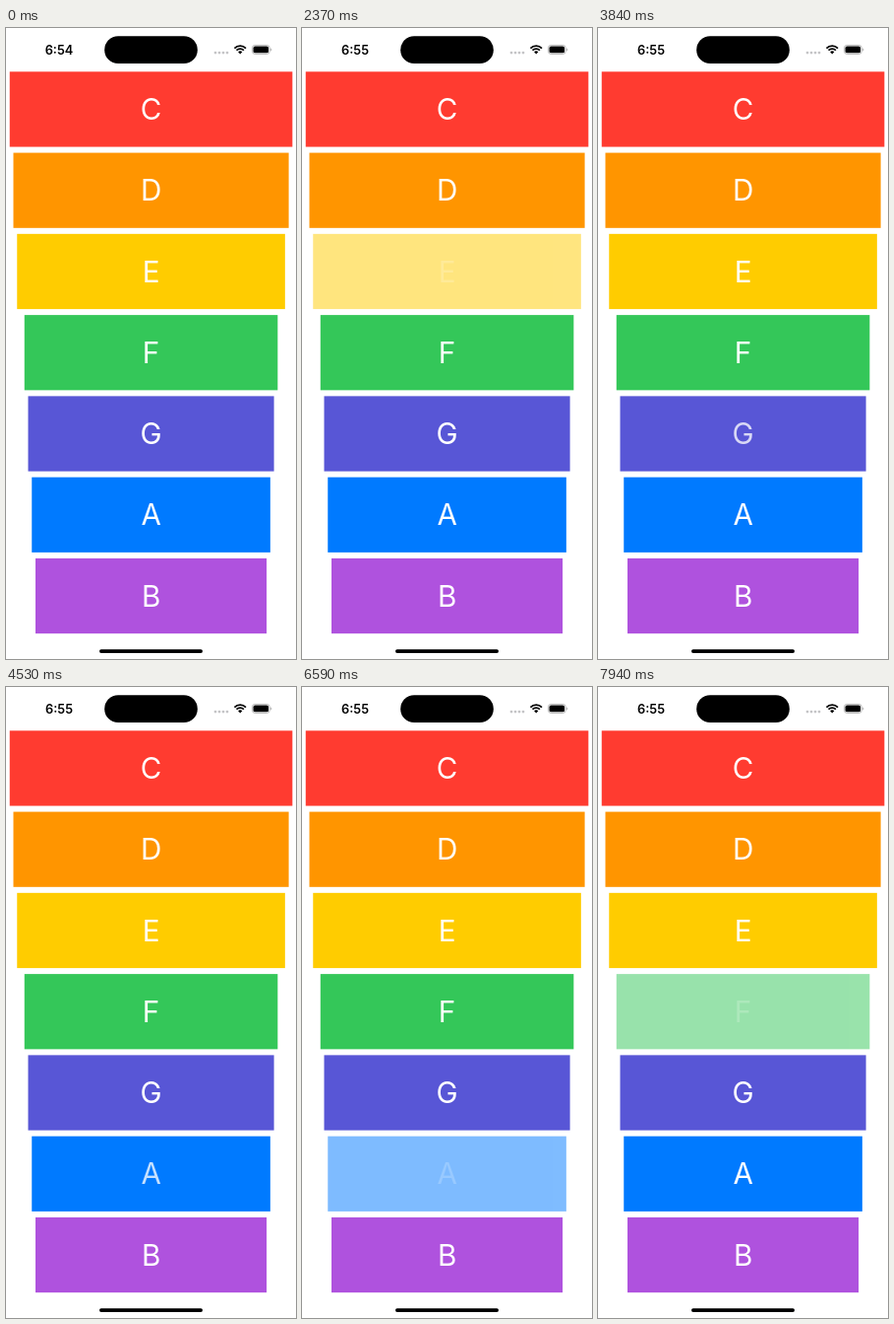
An HTML page for the animation above (8000 ms loop, 295x640 px).

```html
<!DOCTYPE html>
<html lang="en">
<head>
<meta charset="utf-8">
<title>Xylophone</title>
<style>
  html, body { margin: 0; width: 100%; height: 100%; overflow: hidden; background: #fff; }
  svg { display: block; width: 295px; height: 640px; font-family: Inter, Roboto, sans-serif; }
  .key text { fill: #fff; font-size: 29.6px; text-anchor: middle; }
  #clock { font-size: 12.8px; font-weight: 600; text-anchor: middle; }
</style>
</head>
<body>
<svg id="stage" viewBox="0 0 295 640">
  <text id="clock" x="54" y="26.6">6:54</text>
  <rect x="100.2" y="8.3" width="94.6" height="27.8" rx="13.9"/>
  <g fill="#c4c4c6">
    <circle cx="213" cy="25.1" r="1.4"/>
    <circle cx="217" cy="25.1" r="1.4"/>
    <circle cx="221" cy="25.1" r="1.4"/>
    <circle cx="225" cy="25.1" r="1.4"/>
  </g>
  <g transform="translate(238.2 26.4)">
    <path d="M0 0L-2.1-2.1A3 3 0 0 1 2.1-2.1Z"/>
    <path d="M-3.7-3.7A5.2 5.2 0 0 1 3.7-3.7M-5.8-5.8A8.2 8.2 0 0 1 5.8-5.8" fill="none" stroke="#000" stroke-width="1.8"/>
  </g>
  <rect x="250.4" y="17.4" width="17.8" height="9" rx="2.9" fill="none" stroke="#a6a6a6" stroke-width=".8"/>
  <rect x="251.5" y="18.5" width="15.6" height="6.8" rx="1.9"/>
  <path d="M269.3 20.4a1.6 1.6 0 0 1 0 3z" fill="#a6a6a6"/>
  <rect x="95" y="630.2" width="105" height="3.7" rx="1.85"/>
</svg>
<script>
  const LOOP = 8000, STEP = 110, DIM_TIME = 200, KEY_H = 76.25, PITCH = 82.27;
  const stage = document.getElementById('stage');
  const clock = document.getElementById('clock');

  // name, colour, side margin
  const keys = [
    ['C', '#ff3b30', 3.75], ['D', '#ff9500', 7.5], ['E', '#ffcc00', 11.25],
    ['F', '#34c759', 18.75], ['G', '#5856d6', 22.5], ['A', '#007aff', 26.25],
    ['B', '#af52de', 30]
  ].map(([name, fill, margin], i) => {
    const y = 44.3 + i * PITCH;
    const group = add(stage, 'g', { class: 'key' });
    add(group, 'rect', { x: margin, y, width: 295.1 - 2 * margin, height: KEY_H, fill });
    const label = add(group, 'text', { x: 147.6, y: y + KEY_H / 2 + 10.7 });
    label.textContent = name;
    return { name, group, label };
  });

  // key, finger down, finger up
  const taps = [
    ['C', 850, 960], ['D', 1570, 1680], ['E', 2260, 2370], ['F', 3000, 3000],
    ['G', 3620, 3620], ['A', 4170, 4310], ['B', 4910, 5070], ['B', 5780, 5890],
    ['A', 6480, 6590], ['G', 7150, 7310], ['F', 7940, 7940]
  ];
  const fade = [0.2, 0.46, 0.77, 0.93];

  function add(parent, tag, attrs) {
    const el = document.createElementNS('http://www.w3.org/2000/svg', tag);
    for (const k in attrs) el.setAttribute(k, attrs[k]);
    return parent.appendChild(el);
  }

  function draw(t) {
    clock.textContent = t < 300 ? '6:54' : '6:55';
    for (const { name, group, label } of keys) {
      const tap = taps.filter(([key, down]) => key === name && down <= t).pop();
      const age = tap ? t - tap[2] : Infinity;
      const level = age < 0 ? fade[0] : fade[Math.floor(age / STEP)] ?? 1;
      group.style.opacity = age >= 0 && age < DIM_TIME ? 0.5 : 1;
      label.style.opacity = level;
    }
  }

  const start = performance.now();
  function tick() {
    draw((performance.now() - start) % LOOP);
    requestAnimationFrame(tick);
  }
  tick();
</script>
</body>
</html>
```
